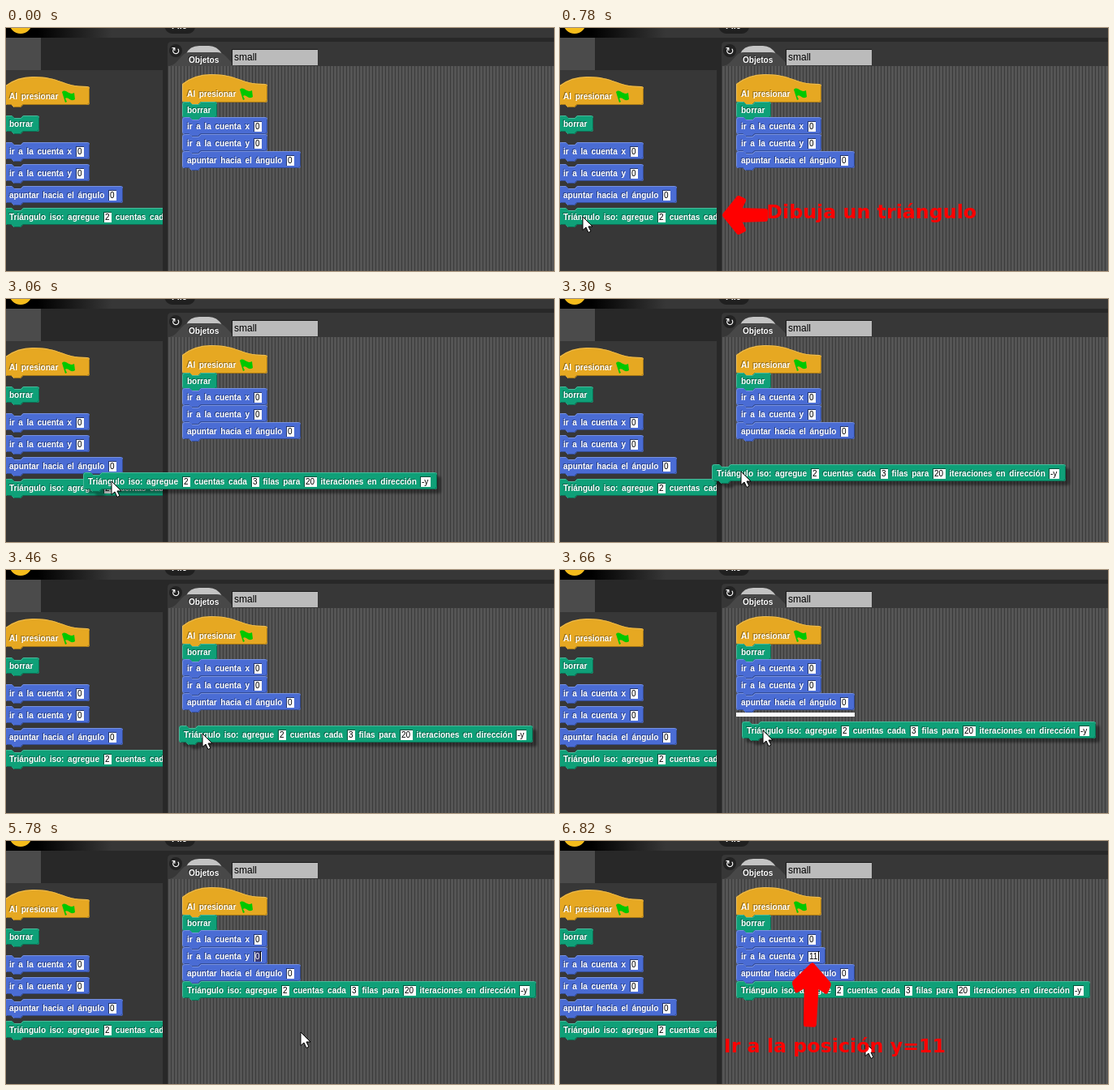
An HTML page with a canvas that plays this animation: 675 by 300 pixels, repeating every 8000 ms.

```html
<!DOCTYPE html>
<html lang="es">
<head>
<meta charset="utf-8">
<style>
html, body { margin: 0; width: 100%; height: 100%; overflow: hidden; background: #282828; }
canvas { display: block; }
</style>
</head>
<body>
<canvas id="stage" width="675" height="300"></canvas>
<script>
const ctx = document.getElementById('stage').getContext('2d');
const LOOP = 8000, GAP = 4.65, PAD = 6;
const SANS = '"Liberation Sans", Arial, sans-serif';
const LABEL = `bold 10px ${SANS}`, VALUE = `10px ${SANS}`;
const BLUE = [74, 108, 212], GREEN = [15, 160, 120], GOLD = [230, 168, 34];
const FRAME = '#373737', BACK = '#282828';
const TRIANGLE = 'Triángulo iso: agregue [2] cuentas cada [3] filas para [20] iteraciones en dirección [-y]';
const ANGLE = 'apuntar hacia el ángulo [0]';

// Each key: time, x, y
const pointerKeys = [
  [40, 129, 283], [160, 98, 266], [320, 50, 245], [440, 26, 236], [520, 21, 234],
  [779, 21, 234], [780, 28, 233], [2740, 28, 233], [2780, 36, 236], [2900, 68, 233],
  [3300, 223, 213], [3440, 241, 203], [3580, 250, 198], [3900, 251, 198],
  [4080, 266, 189], [4420, 307, 154], [4600, 315, 146], [4720, 314, 143],
  [4800, 306, 141], [5360, 306, 141], [5500, 318, 161], [5820, 369, 246],
  [6020, 382, 268], [6199, 382, 268], [6200, 382, 272], [6630, 382, 272], [6820, 376, 249]
];
const dragKeys = [[2780, 4, 222], [2900, 33, 221], [3300, 187, 204], [3440, 211, 193], [3580, 223, 187], [3660, 224, 187]];

function follow(keys, t) {
  const i = keys.findIndex(k => k[0] > t);
  if (i < 0) return keys[keys.length - 1].slice(1);
  if (i === 0) return keys[0].slice(1);
  const [t0, x0, y0] = keys[i - 1], [t1, x1, y1] = keys[i];
  const p = (t - t0) / (t1 - t0);
  return [Math.round(x0 + (x1 - x0) * p), Math.round(y0 + (y1 - y0) * p)];
}

const shade = (rgb, k) => `rgb(${rgb.map(c => k > 0 ? c + (255 - c) * k : c * (1 + k)).join()})`;

function rect(color, x, y, w, h) {
  ctx.fillStyle = color;
  ctx.fillRect(x, y, w, h);
}

function fillPath(color, d, x = 0, y = 0) {
  ctx.save();
  ctx.translate(x, y);
  ctx.fillStyle = color;
  ctx.fill(new Path2D(d));
  ctx.restore();
}

function text(str, x, y, font, color) {
  ctx.font = font;
  ctx.fillStyle = color;
  ctx.fillText(str, x, y);
}

function width(str, font) {
  ctx.font = font;
  return ctx.measureText(str).width;
}

// Splits a label into placed words and input slots
function layout(label) {
  let x = PAD;
  const parts = label.split(' ').map(word => {
    const slot = word[0] === '[';
    const str = slot ? word.slice(1, -1) : word;
    const w = slot ? width(str, VALUE) + 4.8 : width(str, LABEL);
    const part = { str, slot, x, w };
    x += w + GAP;
    return part;
  });
  return { parts, w: Math.ceil(x - GAP + PAD + 1) };
}

function bevel(path, color, offset) {
  ctx.save();
  ctx.translate(offset, offset);
  ctx.strokeStyle = color;
  ctx.stroke(path);
  ctx.restore();
}

function drawShape(path, rgb, shadow) {
  ctx.save();
  if (shadow) {
    ctx.shadowColor = 'rgba(0,0,0,.4)';
    ctx.shadowOffsetX = ctx.shadowOffsetY = 5;
    ctx.shadowBlur = 3;
  }
  ctx.fillStyle = shade(rgb, 0);
  ctx.fill(path);
  ctx.shadowColor = 'transparent';
  ctx.clip(path);
  ctx.lineWidth = 1;
  bevel(path, shade(rgb, -.3), -.5);
  bevel(path, shade(rgb, .25), .5);
  ctx.restore();
}

function drawWord(str, x, y, rgb) {
  text(str, x - 1, y - 1, LABEL, shade(rgb, -.4));
  text(str, x, y, LABEL, '#fff');
}

function drawSlot({ str, x, w }, rgb, edit) {
  const left = Math.round(x), wide = Math.round(w);
  rect(shade(rgb, -.5), left, 5, wide, 13);
  rect('#fff', left + 1, 6, wide - 1, 12);
  if (edit && edit.selected) rect('rgb(60,60,120)', left + 2, 6, wide - 3, 12);
  text(str, left + 2, 15, VALUE, edit && edit.selected ? '#fff' : '#000');
  if (edit && edit.caret) rect('#000', left + wide - 2, 5, 1, 12);
}

function block(label, rgb, x, y, { shadow, edit } = {}) {
  const { parts, w } = layout(label);
  const h = parts.some(part => part.slot) ? 21 : 20;
  const path = new Path2D(`M0 3Q0 0 3 0H9L12 3H20L23 0H${w - 3}Q${w} 0 ${w} 3V${h - 3}
    Q${w} ${h} ${w - 3} ${h}H23L20 ${h + 3}H12L9 ${h}H3Q0 ${h} 0 ${h - 3}Z`);
  ctx.save();
  ctx.translate(x, y);
  drawShape(path, rgb, shadow);
  for (const part of parts) {
    if (part.slot) drawSlot(part, rgb, edit);
    else drawWord(part.str, part.x, h - 6, rgb);
  }
  ctx.restore();
}

function hat(x, y) {
  ctx.save();
  ctx.translate(x, y);
  drawShape(new Path2D('M0 12Q15 0 35 0C70 0 70 12 102 12Q105 12 105 15V32Q105 35 102 35H23L20 38H12L9 35H3Q0 35 0 32Z'), GOLD);
  drawWord('Al', 6, 28, GOLD);
  drawWord('presionar', 20.7, 28, GOLD);
  fillPath('#00c800', 'M0 2C5-3 8 7 15 3L16 11C10 15 8 7 4 10L6 14L4 15Z', 71, 17);
  ctx.restore();
}

function drawPalette() {
  rect(FRAME, 0, 52, 193, 248);
  rect('#4b4b4b', 0, 12, 43, 40);
  ctx.save();
  ctx.beginPath();
  ctx.rect(0, 52, 193, 248);
  ctx.clip();
  hat(-2, 60);
  block('borrar', GREEN, -2, 108);
  block('ir a la cuenta x [0]', BLUE, -2, 141);
  block('ir a la cuenta y [0]', BLUE, -2, 168);
  block(ANGLE, BLUE, -2, 195);
  block(TRIANGLE, GREEN, -2, 222);
  ctx.restore();
}

function drawFrame() {
  rect(BACK, 0, 0, 675, 300);
  const bar = ctx.createLinearGradient(0, 0, 130, 0);
  bar.addColorStop(.3, '#000');
  bar.addColorStop(1, FRAME);
  rect(bar, 0, 0, 675, 12);
  fillPath('#f5bc1c', 'M4-7a14 14 0 1 0 28 0a14 14 0 1 0-28 0Z');
  fillPath('#202020', 'M194-6Q196 7 205 7H224Q233 7 234-6Z');
  text('File', 204, 1, `bold 11px ${SANS}`, '#fff');

  fillPath(FRAME, 'M199 22Q199 17 204 17H675V47H199Z');
  rect('#555', 199, 47, 476, 253);
  for (let x = 199; x < 675; x += 4) rect('#3a3a3a', x, 47, 1, 253);

  fillPath('#c4c4c4', 'M222 32Q226 22 238 22H250Q260 22 266 32Z');
  fillPath('#222', 'M201 28a8 8 0 1 0 16 0a8 8 0 1 0-16 0Z');
  text('↻', 203.5, 33, '13px "DejaVu Sans", sans-serif', '#fff');
  fillPath('#484848', 'M199 47C213 47 214 30 226 30H260C274 30 274 47 289 47Z');
  text('Objetos', 224, 42, LABEL, '#222');
  text('Objetos', 225, 43, LABEL, '#fff');
  rect('#1c1c1c', 278, 26, 106, 20);
  rect('#bbb', 279, 27, 105, 19);
  text('small', 281, 40, `12px ${SANS}`, '#000');
}

function drawScript(t) {
  const value = t < 6660 ? '0' : t < 6740 ? '1' : '11';
  const edit = t >= 5380 && { selected: t < 6660, caret: t < 6430 || t >= 6660 };
  hat(217, 57);
  block('borrar', GREEN, 217, 91);
  block('ir a la cuenta x [0]', BLUE, 217, 110);
  block(`ir a la cuenta y [${value}]`, BLUE, 217, 131, { edit });
  block(ANGLE, BLUE, 217, 152);
  if (t >= 3920) block(TRIANGLE, GREEN, 217, 173);
  if (t >= 3540 && t < 3920) rect('#fff', 217, 176, 146, 5);
}

function drawPointer(x, y) {
  const path = new Path2D('M0 0V16.5L4 13L7 19.5L10 18L7 12H12Z');
  ctx.save();
  ctx.translate(x, y);
  ctx.fillStyle = '#fff';
  ctx.strokeStyle = '#000';
  ctx.lineWidth = 1;
  ctx.fill(path);
  ctx.stroke(path);
  ctx.restore();
}

function arrow(x, y, angle, stretch, length) {
  const end = length - 3;
  const path = new Path2D(`M4 0L21-21L27-18L21-6L${end}-5V5L21 6L27 18L21 21Z`);
  ctx.save();
  ctx.translate(x, y);
  ctx.rotate(angle);
  ctx.scale(stretch, 1);
  ctx.lineWidth = 6;
  ctx.lineJoin = 'round';
  ctx.fill(path);
  ctx.stroke(path);
  ctx.restore();
}

function drawNotes(t) {
  const font = 'bold 23.75px "DejaVu Sans", sans-serif';
  ctx.fillStyle = ctx.strokeStyle = '#f00';
  if (t >= 780 && t < 2780) {
    arrow(199, 231, 0, 1, 57);
    text('Dibuja un triángulo', 254.3, 235, font, '#f00');
  }
  if (t >= 6820) {
    arrow(311, 149, Math.PI / 2 + .04, 1.3, 62);
    text('Ir a la posición y=11', 201.8, 261, font, '#f00');
  }
}

function draw(now) {
  const t = now % LOOP;
  drawFrame();
  drawPalette();
  drawScript(t);
  if (t >= 2780 && t < 3920) block(TRIANGLE, GREEN, ...follow(dragKeys, t), { shadow: true });
  if (t >= 40) drawPointer(...follow(pointerKeys, t));
  drawNotes(t);
  requestAnimationFrame(draw);
}
requestAnimationFrame(draw);
</script>
</body>
</html>
```
